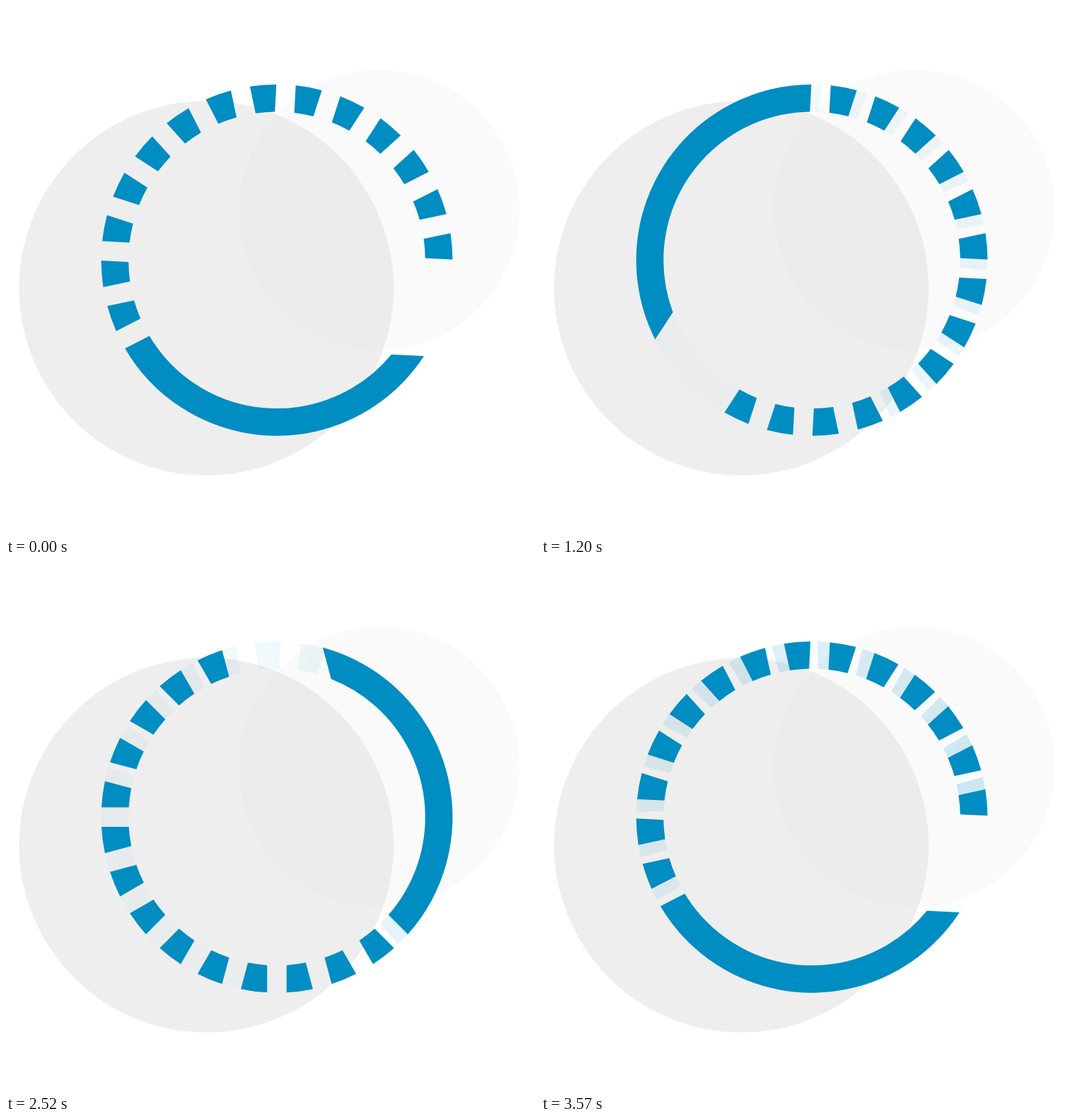
Animation, 748 px wide and 748 px high, one loop 3.6 s. Source, as an HTML page with a canvas:

```html
<!DOCTYPE html>
<html lang="en">
<head>
<meta charset="utf-8">
<title>Rotating ring</title>
<style>
  html, body { margin: 0; width: 100%; height: 100%; overflow: hidden; background: #fff; }
  canvas { display: block; width: 748px; height: 748px; }
</style>
</head>
<body>
<canvas id="stage" width="748" height="748"></canvas>
<script>
const ctx = document.getElementById('stage').getContext('2d');
const LOOP = 3600, STEP = 30;
const CX = 383, CY = 359.3, OUTER = 248.4, INNER = 209.8;
const HALF_GAP = 13.75;
const rad = deg => deg * Math.PI / 180;

// Slice of the ring between two spokes; its ends run parallel to the spokes.
function slice(path, from, to, offset = HALF_GAP) {
  const start = r => rad(from) + Math.asin(offset / r);
  const end = r => rad(to) - Math.asin(HALF_GAP / r);
  const part = new Path2D();
  part.arc(0, 0, OUTER, start(OUTER), end(OUTER));
  part.arc(0, 0, INNER, end(INNER), start(INNER), true);
  part.closePath();
  path.addPath(part);
}

const ring = new Path2D();
slice(ring, 3, 153, 124.7);
for (let i = 0; i < 14; i++) slice(ring, 153 + 15 * i, 168 + 15 * i);

const fade = ctx.createConicGradient(rad(30), 0, 0);
fade.addColorStop(0, 'rgba(0,141,194,.06)');
fade.addColorStop(1, 'rgba(0,141,194,1)');

function disc(x, y, r, fill) {
  ctx.fillStyle = fill;
  ctx.beginPath();
  ctx.arc(x, y, r, 0, 2 * Math.PI);
  ctx.fill();
}

function drawRing(angle, fill, alpha) {
  ctx.save();
  ctx.translate(CX, CY);
  ctx.rotate(rad(angle));
  ctx.globalAlpha = alpha;
  ctx.fillStyle = fill;
  ctx.fill(ring);
  ctx.restore();
}

// The ring turns evenly, with a slight rush at the end of the loop.
const mainAngle = n => 3 * n + 2.7 * Math.pow(Math.max(0, n - 84) / 35, 1.6);

// The pale ring swings out with easing and comes back evenly.
const paleAngle = n => n < 59
  ? 41.5 * (1 - Math.cos(Math.PI * n / 59))
  : 83 - 1.457 * (n - 59);

const paleAlpha = n => 0.06 + 0.14 * Math.sin(Math.abs(1 - n / 60) * Math.PI / 2) ** 2;

function draw(ms) {
  const n = Math.floor((ms % LOOP) / STEP + 0.001);
  ctx.clearRect(0, 0, 748, 748);
  disc(283.3, 399, 264.8, '#eee');
  disc(528, 288.3, 198.3, 'rgba(227,227,227,.18)');
  drawRing(paleAngle(n), fade, paleAlpha(n));
  drawRing(mainAngle(n), '#008dc2', 1);
}

let begin;
function tick(now) {
  begin ??= now;
  draw(now - begin);
  requestAnimationFrame(tick);
}
draw(0);
requestAnimationFrame(tick);
</script>
</body>
</html>
```
